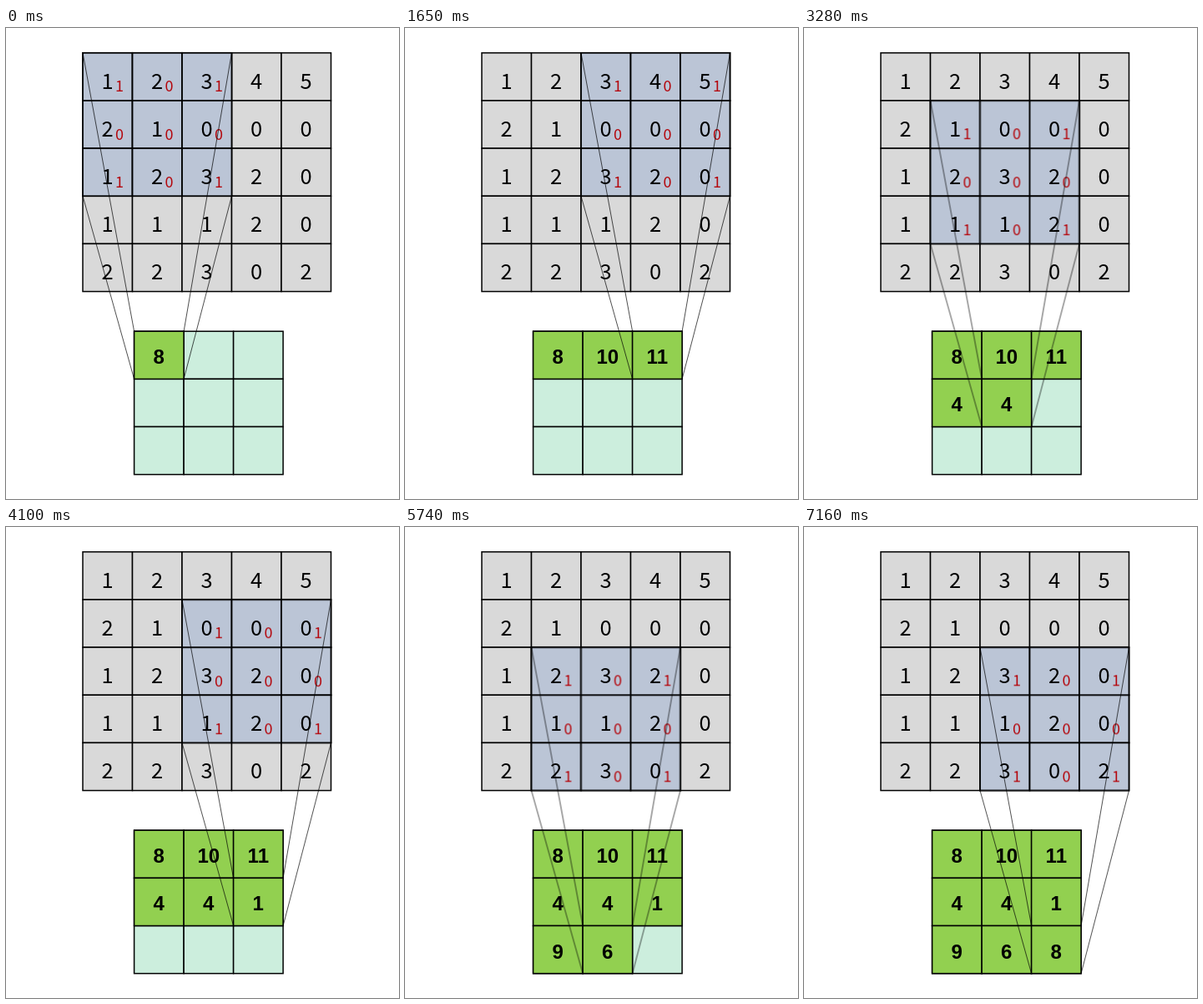
Write an HTML page that moves like this. It is 471x564 px and loops after 7.36 s.

```html
<!DOCTYPE html>
<html lang="en">
<head>
<meta charset="utf-8">
<title>3×3 convolution</title>
<style>
  html, body { margin: 0; width: 100%; height: 100%; overflow: hidden; background: #fff; }
  svg { display: block; width: 471px; height: 564px; }
  text { text-anchor: middle; font-family: "Noto Sans CJK SC", "Noto Sans CJK JP", "Noto Sans", sans-serif; }
  rect { stroke: #000; stroke-width: 1.5; }
  .num { font-size: 25.5px; font-weight: 300; }
  .weight { font-size: 18px; font-weight: 300; fill: #b4060c; }
  .sum { font: bold 24px "Liberation Sans", Arial, sans-serif; }
  .in { fill: #d9d9d9; }
  .out { fill: #cceedd; }
  .done { fill: #92d050; }
  .kernel { fill: #bbc5d6; stroke-width: 1.8; }
  .ray { stroke: #000; stroke-width: .7; }
  .slide { animation: slide 7360ms step-end infinite; }
  .reveal { animation: 7360ms step-end infinite; }

  /* One step is a cell: 59.5 across, 57.15 down */
  @keyframes slide {
    0% { transform: translate(0, 0); }
    11.141% { transform: translate(59.5px, 0); }
    22.418% { transform: translate(119px, 0); }
    33.288% { transform: translate(0, 57.15px); }
    44.565% { transform: translate(59.5px, 57.15px); }
    55.706% { transform: translate(119px, 57.15px); }
    66.711% { transform: translate(0, 114.3px); }
    77.989% { transform: translate(59.5px, 114.3px); }
    88.858%, 100% { transform: translate(119px, 114.3px); }
  }
  @keyframes show1 { 0% { opacity: 0; } 11.141%, 100% { opacity: 1; } }
  @keyframes show2 { 0% { opacity: 0; } 22.418%, 100% { opacity: 1; } }
  @keyframes show3 { 0% { opacity: 0; } 33.288%, 100% { opacity: 1; } }
  @keyframes show4 { 0% { opacity: 0; } 44.565%, 100% { opacity: 1; } }
  @keyframes show5 { 0% { opacity: 0; } 55.706%, 100% { opacity: 1; } }
  @keyframes show6 { 0% { opacity: 0; } 66.711%, 100% { opacity: 1; } }
  @keyframes show7 { 0% { opacity: 0; } 77.989%, 100% { opacity: 1; } }
  @keyframes show8 { 0% { opacity: 0; } 88.858%, 100% { opacity: 1; } }
</style>
</head>
<body>
<svg id="stage" viewBox="0 0 471 564"></svg>
<script>
  const W = 59.5, H = 57.15;
  const IN = { x: 92, y: 29.8 }, OUT = { x: 153.6, y: 363.2 };
  const input = ["12345", "21000", "12320", "11120", "22302"];
  const kernel = ["101", "000", "101"];

  const grid = (rows, cols, draw) => {
    let s = "";
    for (let r = 0; r < rows; r++)
      for (let c = 0; c < cols; c++) s += draw(r, c);
    return s;
  };
  const box = (at, r, c, cls) =>
    `<rect class="${cls}" x="${at.x + c * W}" y="${at.y + r * H}" width="${W}" height="${H}"/>`;
  const label = (at, r, c, dx, dy, cls, value) =>
    `<text class="${cls}" x="${at.x + c * W + dx}" y="${at.y + r * H + dy}">${value}</text>`;
  const ray = (x1, y1, x2, y2) =>
    `<line class="ray" x1="${x1}" y1="${y1}" x2="${x2}" y2="${y2}"/>`;

  // Sum of the input under the kernel placed at row r, column c
  const convolve = (r, c) => {
    let sum = 0;
    for (let i = 0; i < 3; i++)
      for (let j = 0; j < 3; j++) sum += input[r + i][c + j] * kernel[i][j];
    return sum;
  };

  const result = (r, c) => {
    const n = r * 3 + c;
    const style = n ? ` class="reveal" style="animation-name:show${n}"` : "";
    return `<g${style}>${box(OUT, r, c, "done")}${label(OUT, r, c, 29.7, 39, "sum", convolve(r, c))}</g>`;
  };

  const rays = [0, 1].map(i => [0, 1].map(j =>
    ray(IN.x + 3 * W * j, IN.y + 3 * H * i, OUT.x + W * j, OUT.y + H * i)).join("")).join("");

  document.getElementById("stage").innerHTML =
    grid(5, 5, (r, c) => box(IN, r, c, "in")) +
    `<g class="slide">${grid(3, 3, (r, c) => box(IN, r, c, "kernel"))}</g>` +
    grid(5, 5, (r, c) => label(IN, r, c, 29.5, 42.8, "num", input[r][c])) +
    grid(3, 3, (r, c) => box(OUT, r, c, "out")) +
    grid(3, 3, result) +
    `<g class="slide">${grid(3, 3, (r, c) => label(IN, r, c, 44, 46.6, "weight", kernel[r][c]))}${rays}</g>`;
</script>
</body>
</html>
```
